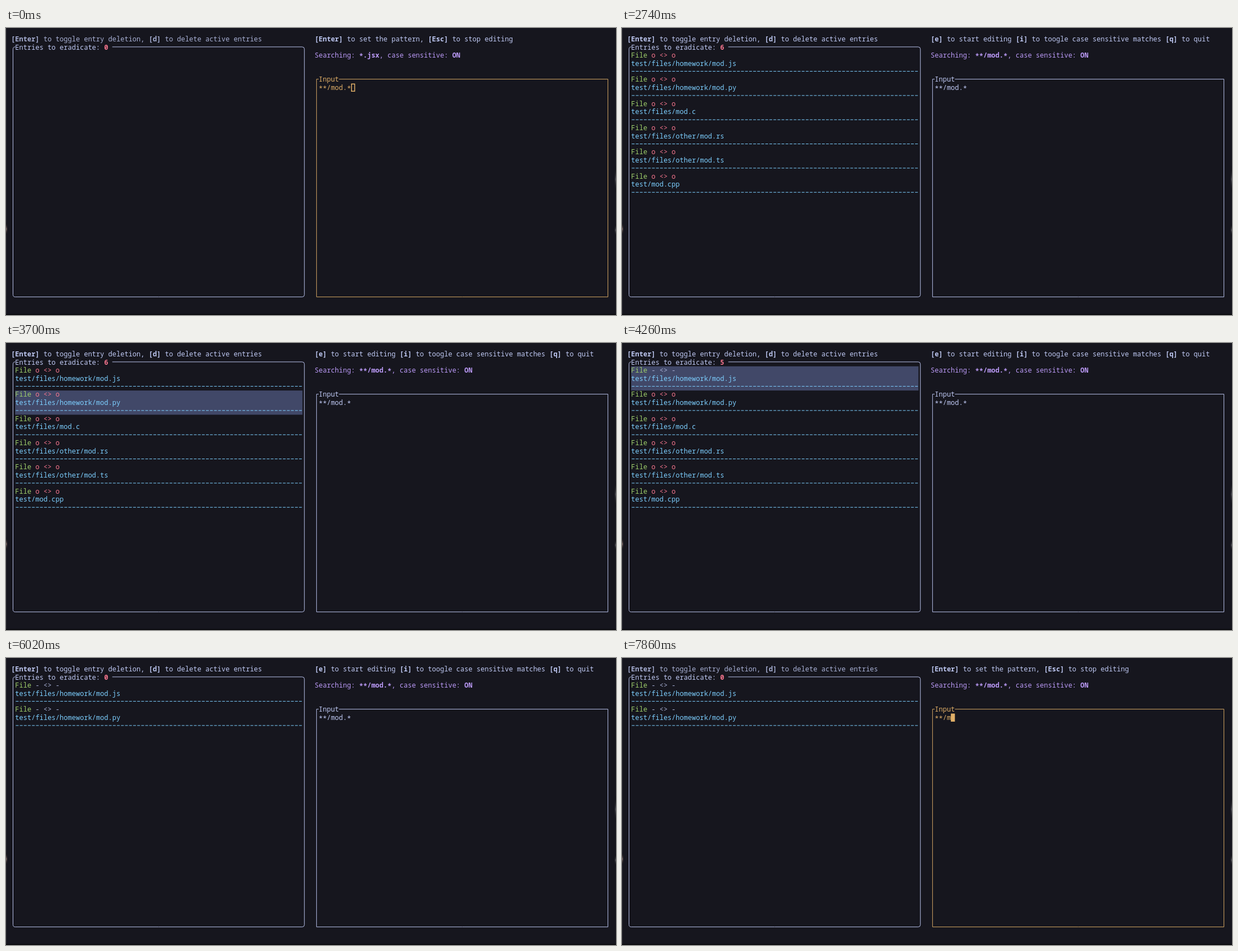
An HTML page with a canvas for the animation above (8000 ms loop, 1089 by 514 pixels).

```html
<!DOCTYPE html>
<html lang="en">
<head>
<meta charset="utf-8">
<title>Terminal file cleaner</title>
<style>
  html, body { margin: 0; width: 100%; height: 100%; overflow: hidden; background: #16161e; }
  canvas { display: block; }
</style>
</head>
<body>
<canvas id="stage" width="1089" height="514"></canvas>
<script>
const ctx = document.getElementById('stage').getContext('2d');
const W = 1089, H = 514, LOOP = 8000;
const CELL_W = 7.225, CELL_H = 14.445, LEFT = 9.1, MID = 20.1;
const FACE = '12px "Noto Sans Mono", "DejaVu Sans Mono", monospace';
const C = {
  bg: '#16161e', fg: '#c0caf5', dim: '#a9b1d6', yellow: '#e0af68', purple: '#bb9af7',
  red: '#f7768e', green: '#9ece6a', cyan: '#7dcfff', select: '#414868'
};
const FILES = ['files/homework/mod.js', 'files/homework/mod.py', 'files/mod.c',
  'files/other/mod.rs', 'files/other/mod.ts', 'mod.cpp'];

// Each step changes part of the state at its time.
const STEPS = [
  [0, { edit: true, cursor: 'hollow', input: '**/mod.*', pattern: '*.jsx', count: 0, shown: 0, kept: 0, sel: -1 }],
  [500, { cursor: 'solid' }],
  [980, { pattern: '**/mod.*', count: 6, shown: 6 }],
  [2740, { edit: false, cursor: '' }],
  [3140, { sel: 0 }],
  [3220, { sel: 1 }],
  [3380, { sel: 2 }],
  [3700, { sel: 1 }],
  [3860, { sel: 0 }],
  [4260, { kept: 1, count: 5 }],
  [4500, { sel: 1 }],
  [4740, { kept: 2, count: 4 }],
  [6020, { sel: -1, count: 0, shown: 2 }],
  [6900, { edit: true }],
  [6980, { cursor: 'solid' }],
  [7540, { input: '**/mod.' }],
  [7620, { input: '**/mod' }],
  [7780, { input: '**/mo' }],
  [7860, { input: '**/m' }]
];

const colX = c => LEFT + c * CELL_W;
const rowY = r => MID + r * CELL_H;

function stateAt(t) {
  return Object.assign({}, ...STEPS.filter(s => s[0] <= t).map(s => s[1]));
}

// Writes on the cell grid; parts between | marks are bold.
function write(col, row, text, color, boldColor = color) {
  const base = Math.round(rowY(row) + 4.1);
  text.split('|').forEach((part, i) => {
    ctx.font = (i % 2 ? 'bold ' : '') + FACE;
    ctx.fillStyle = i % 2 ? boldColor : color;
    for (const ch of part) {
      ctx.fillText(ch, colX(col++), base + (ch === '*' ? 2 : 0));
    }
  });
}

// Box outline with a gap in the top edge for its title.
function frame(col, row, endCol, endRow, gapEnd, radius, color) {
  const lineX = c => colX(c + 0.5) - 0.2;
  const lineY = r => rowY(r) - 0.7;
  const x = lineX(col), r = lineX(endCol);
  const y = lineY(row), b = lineY(endRow);
  ctx.strokeStyle = color;
  ctx.lineWidth = 0.95;
  ctx.beginPath();
  ctx.moveTo(colX(gapEnd), y);
  ctx.arcTo(r, y, r, b, radius);
  ctx.arcTo(r, b, x, b, radius);
  ctx.arcTo(x, b, x, y, radius);
  ctx.arcTo(x, y, colX(col + 1), y, radius);
  ctx.lineTo(colX(col + 1), y);
  ctx.stroke();
}

function entry(i, s) {
  const row = 2 + i * 3;
  if (s.sel === i) {
    ctx.fillStyle = C.select;
    ctx.fillRect(colX(1), rowY(row - 0.5), 71 * CELL_W, 3 * CELL_H);
  }
  const kept = i < s.kept;
  write(1, row, 'File', C.green);
  write(6, row, kept ? '- <> -' : 'o <> o', kept ? C.dim : C.red);
  write(1, row + 1, 'test/' + FILES[i], C.cyan);
  ctx.fillStyle = C.cyan;
  for (let c = 1; c <= 71; c++) ctx.fillRect(colX(c) + 1.1, rowY(row + 2) - 0.8, 5, 1);
}

function cursor(kind, col) {
  if (!kind) return;
  const x = colX(col), y = rowY(5.5), line = 1.5;
  ctx.fillStyle = C.yellow;
  ctx.fillRect(x, y, CELL_W, CELL_H);
  if (kind === 'hollow') {
    ctx.fillStyle = C.bg;
    ctx.fillRect(x + line, y + line, CELL_W - 2 * line, CELL_H - 2 * line);
  }
}

function glow(x, y, h, color) {
  const g = ctx.createLinearGradient(0, y, 0, y + h);
  g.addColorStop(0, 'transparent');
  g.addColorStop(0.5, color);
  g.addColorStop(1, 'transparent');
  ctx.fillStyle = g;
  ctx.fillRect(x, y, 2, h);
}

function edges() {
  ctx.fillStyle = '#24242c';
  ctx.fillRect(0, 0, 1, H);
  ctx.fillStyle = '#0b0b0f';
  ctx.fillRect(0, H - 2, W, 2);
  glow(0, 348, 24, '#71605f');
  glow(W - 2, 246, 50, '#45454c');
  glow(W - 2, 350, 24, '#4b4b50');
}

function draw(t) {
  const s = stateAt(t);
  const tone = s.edit ? C.yellow : C.fg;
  ctx.fillStyle = C.bg;
  ctx.fillRect(0, 0, W, H);
  edges();

  write(0, 0, '|[Enter]| to toggle entry deletion, |[d]| to delete active entries', s.edit ? C.dim : C.fg);
  frame(0, 1, 72, 32, 25, 4, C.fg);
  write(1, 1, 'Entries to eradicate: |' + s.count + '|', C.fg, C.red);
  for (let i = 0; i < s.shown; i++) entry(i, s);

  write(75, 0, s.edit
    ? '|[Enter]| to set the pattern, |[Esc]| to stop editing'
    : '|[e]| to start editing |[i]| to toogle case sensitive matches |[q]| to quit', C.fg);
  write(75, 2, 'Searching: |' + s.pattern + '|, case sensitive: |ON|', C.purple);
  frame(75, 5, 147, 32, 81, 0, tone);
  write(76, 5, 'Input', tone);
  write(76, 6, s.input, tone);
  cursor(s.cursor, 76 + s.input.length);
}

const start = performance.now();
function tick() {
  draw((performance.now() - start) % LOOP);
  requestAnimationFrame(tick);
}
tick();
</script>
</body>
</html>
```
